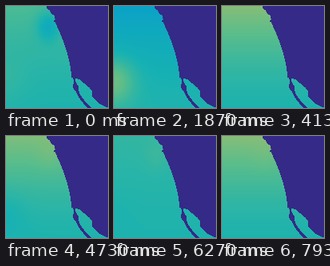
A matplotlib script for the animation above (7.99 s loop, 128 px wide and 128 px high).

```python
import numpy as np
import matplotlib.pyplot as plt
from matplotlib.animation import FuncAnimation
from matplotlib.colors import LinearSegmentedColormap
from matplotlib.patches import Polygon

SIZE = 128
LOOP = 7990
STEPS = 120

PARULA = ["#352a87", "#0f5cdd", "#127dd8", "#079ccf", "#15b1b4",
          "#59bd8c", "#a5be6b", "#e1b952", "#fcce2e", "#f9fb0e"]
STOPS = [0, .15, .27, .4, .5, .6, .7, .8, .9, 1]
LAND = PARULA[0]

# Slow changes of the field: open north, upper coast, western edge.
KEYS = [0, 28, 47, 62, 81, 107, 119]
NORTH = [.58, .43, .62, .66, .64, .45, .66]
COAST = [-.09, 0, -.08, 0, .04, 0, .01]
WEST = [.02, .12, .01, 0, -.05, .04, 0]
SOUTH = .515

Y, X = np.mgrid[:SIZE, :SIZE] + 0.5


def spot(x, y, sx, sy):
    return np.exp(-((X - x) / sx)**2 / 2 - ((Y - y) / sy)**2 / 2)


FALL = (1 - Y / SIZE)**1.6
COAST_SPOT = spot(53, 25, 10, 13)
WEST_SPOT = spot(0, 94, 18, 20)


def field(step):
    north, coast, west = (np.interp(step, KEYS, t)
                          for t in (NORTH, COAST, WEST))
    return (SOUTH + (north - SOUTH) * FALL
            + coast * COAST_SPOT + west * WEST_SPOT)


def mainland():
    cape = [(51, 0), (52, 3), (55, 5), (57, 9), (60, 11), (62, 13), (61, 15),
            (63, 17), (60, 19)]
    u = np.linspace(0, 1, 24)
    shore = np.column_stack([62 + 20.5 * (1 - (1 - u)**1.7), 20 + 70 * u])
    gulf = [(87, 90), (93, 92), (99, 97), (105, 102), (108, 106),
            (108, 112), (113, 118), (119, 123), (128, 127), (128, 0)]
    return np.vstack([cape, shore, gulf])


def peninsula():
    y = np.linspace(90, 130, 40)
    u = (y - 90) / 38
    mid = 85.5 + 4 * u + 16 * u**2.5
    half = 0.7 + 1.9 * np.exp(-((y - 102) / 4)**2) + 0.8 * u
    return np.vstack([np.column_stack([mid - half, y]),
                      np.column_stack([mid + half, y])[::-1]])


cmap = LinearSegmentedColormap.from_list("sea", list(zip(STOPS, PARULA)))

fig = plt.figure(figsize=(SIZE / 100, SIZE / 100), dpi=100)
ax = fig.add_axes([0, 0, 1, 1])
ax.axis("off")
sea = ax.imshow(field(0), cmap=cmap, vmin=0, vmax=1, interpolation="nearest",
                extent=(0, SIZE, SIZE, 0), aspect="auto")
for shape in (mainland(), peninsula()):
    ax.add_patch(Polygon(shape, facecolor=LAND, edgecolor="none",
                         antialiased=False))
ax.set_xlim(0, SIZE)
ax.set_ylim(SIZE, 0)


def update(step):
    sea.set_data(field(step))
    return [sea]


anim = FuncAnimation(fig, update, frames=STEPS, interval=LOOP / STEPS,
                     repeat=True, repeat_delay=0)
plt.show()
```
